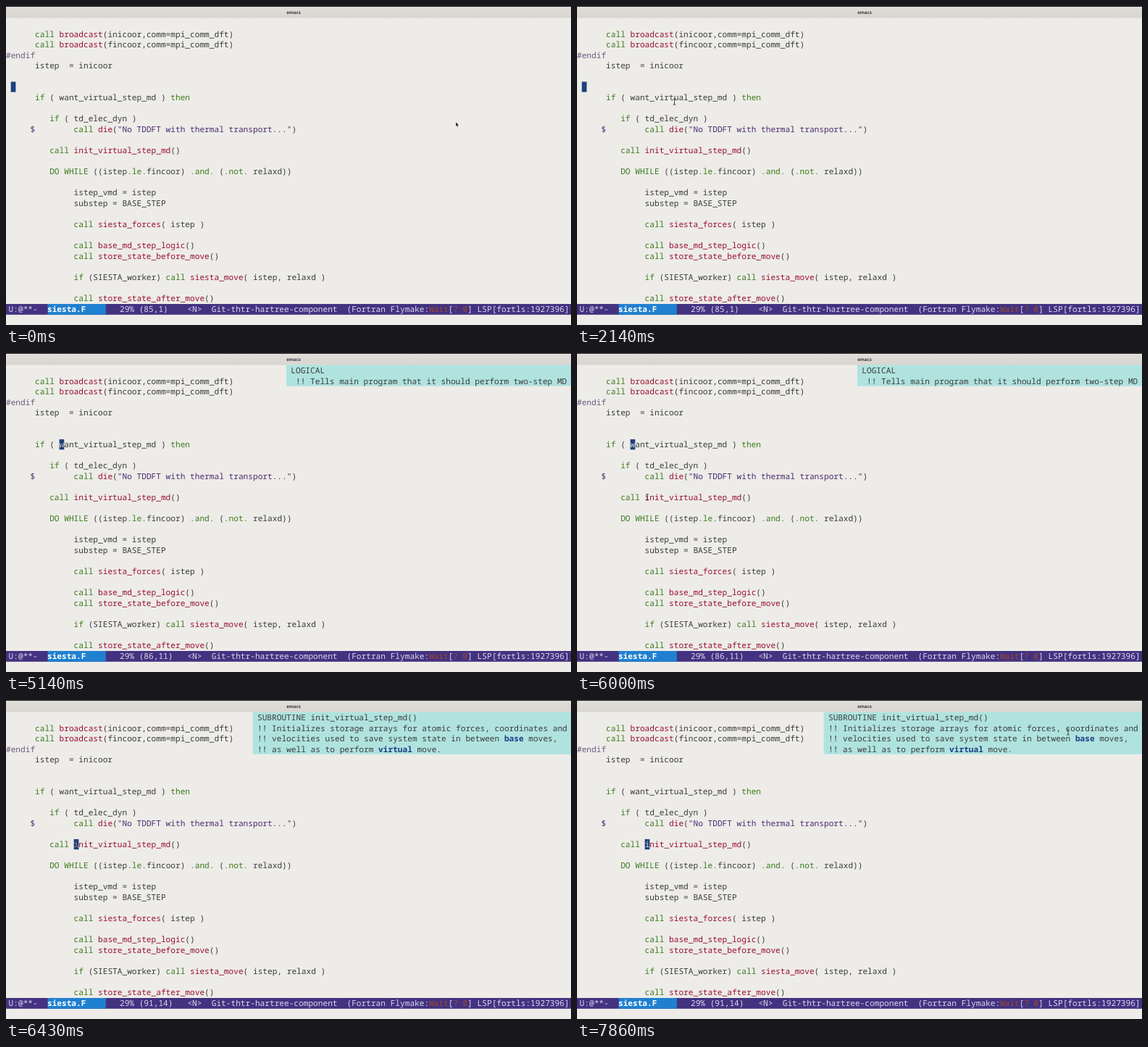
Recreate the animation shown at these times as an HTML page. Size 780 by 440 pixels, loop 8000 ms.

```html
<!DOCTYPE html>
<html lang="en">
<head>
<meta charset="utf-8">
<title>Editor hover help</title>
<style>
html, body { margin: 0; width: 100%; height: 100%; overflow: hidden; background: #edece8; }
svg { display: block; }
text { font: 11.15px "Noto Sans Mono", "DejaVu Sans Mono", monospace; fill: #3b3b3d; white-space: pre; text-rendering: geometricPrecision; }
.key { fill: #3c7a1c; }
.fun { fill: #98102f; }
.str { fill: #4b2b70; }
.pre { fill: #6b5a80; }
.em { fill: #1b3f80; font-weight: bold; }
#title { font: bold 6.2px "Noto Sans", "Open Sans", sans-serif; text-anchor: middle; }
#mode text { fill: #dcd8ee; }
#mode .warn { fill: #9c4a2c; }
#mode .file { fill: #fff; font-weight: bold; }
#letter { fill: #d5d8e2; }
</style>
</head>
<body>
<svg width="780" height="440" viewBox="0 0 780 440">
  <defs>
    <linearGradient id="bar" x2="0" y2="1">
      <stop stop-color="#e2dfdb"/><stop offset="1" stop-color="#d8d5d0"/>
    </linearGradient>
  </defs>
  <rect width="780" height="440" fill="#edece8"/>
  <rect width="780" height="16.5" fill="url(#bar)"/>
  <rect width="780" height="1" fill="#151515"/>
  <text id="title" x="397" y="11.2">emacs</text>
  <g id="code"></g>
  <g id="mode">
    <rect y="411" width="780" height="14.8" fill="#433280"/>
    <rect x="57.5" y="411" width="80.3" height="14.8" fill="#2080d0"/>
  </g>
  <g id="caret"><rect width="6.7" height="14.2" fill="#20407c"/><text id="letter" y="11.1"></text></g>
  <g id="popups"></g>
  <g id="mouse">
    <path id="beam" d="M-1.8-4H1.8M0-4V4M-1.8 4H1.8" fill="none" stroke="#3a3436" stroke-width=".9"/>
    <path id="arrow" d="M0 0V6.2L1.4 5L2.4 7.2L3.4 6.7L2.5 4.6H4.3Z" fill="#111" stroke="#fff" stroke-width=".4"/>
  </g>
</svg>
<script>
const CELL = 6.69, ROW = 14.58, TOP = 17, STEP = 8000 / 56;
const $ = id => document.getElementById(id);
const rowTop = row => TOP + row * ROW;

function make(parent, tag, attrs) {
  const el = document.createElementNS("http://www.w3.org/2000/svg", tag);
  for (const name in attrs) el.setAttribute(name, attrs[name]);
  return parent.appendChild(el);
}

function write(parent, x, row, text, cls = "") {
  const el = make(parent, "text", { x, y: rowTop(row) + 11.1, class: cls });
  el.textContent = text;
  return el;
}

const source = `
      call broadcast(inicoor,comm=mpi_comm_dft)
      call broadcast(fincoor,comm=mpi_comm_dft)
#endif
      istep  = inicoor


      if ( want_virtual_step_md ) then

         if ( td_elec_dyn )
     $        call die("No TDDFT with thermal transport...")

         call init_virtual_step_md()

         DO WHILE ((istep.le.fincoor) .and. (.not. relaxd))

              istep_vmd = istep
              substep = BASE_STEP

              call siesta_forces( istep )

              call base_md_step_logic()
              call store_state_before_move()

              if (SIESTA_worker) call siesta_move( istep, relaxd )

              call store_state_after_move()`.split("\n");

const syntax = /(?<str>"[^"]*"|\$)|(?<pre>#endif)|(?<fun>(?<=call )\w+)|(?<key>\b(?:call|if|then|DO WHILE)\b|\.(?:le|and|not)\.)/g;
source.forEach((line, row) => {
  write($("code"), 0, row, "").innerHTML = line.replace(syntax, (match, ...rest) => {
    const groups = rest.at(-1);
    const cls = Object.keys(groups).find(name => groups[name]);
    return `<tspan class="${cls}">${match}</tspan>`;
  });
});

const status = (col, text, cls) => write($("mode"), 3.6 + col * 6.67, 27, text, cls);
status(0, "U:@**-");
status(8, "siesta.F", "file");
status(23, "29%");
const position = status(27, "");
status(37, "<N>");
status(42, "Git-thtr-hartree-component");
status(70, "(Fortran Flymake:");
status(87, "Wait", "warn");
status(91, "[");
status(92, "? 0", "warn");
status(95, "]");
status(97, "LSP[fortls:1927396]");

function popup(left, lines) {
  const g = make($("popups"), "g", {});
  make(g, "rect", { x: left, y: TOP - .5, width: 780 - left, height: lines.length * ROW, fill: "#b0e3df" });
  lines.forEach((line, row) => {
    write(g, left + 6.3, row, "").innerHTML = line.replace(/\*(\w+)\*/g, '<tspan class="em">$1</tspan>');
  });
  return { g, left, bottom: TOP + lines.length * ROW };
}

const help = [
  popup(387, ["LOGICAL", " !! Tells main program that it should perform two-step MD"]),
  popup(340.7, [
    "SUBROUTINE init_virtual_step_md()",
    "!! Initializes storage arrays for atomic forces, coordinates and",
    "!! velocities used to save system state in between *base* moves,",
    "!! as well as to perform *virtual* move."
  ])
];

// Caret places: start step, buffer line, column, row on screen
const carets = [[0, 85, 1, 6], [20, 86, 11, 7], [43, 91, 14, 12]];

// Pointer path: step, x, y
const path = [
  [0, 621, 160], [10, 621, 160], [11, 600, 159], [12, 600, 159], [13, 430, 150],
  [15, 134.5, 132], [17, 84, 128], [18, 77, 126.5], [36, 77, 126.5], [37, 78, 130],
  [40, 90, 175], [42, 97, 199], [48, 97, 199], [49, 130, 190], [55, 678, 44]
];

function pointerAt(step) {
  const next = path.findIndex(p => p[0] > step);
  if (next < 0) return path.at(-1).slice(1);
  const [s0, x0, y0] = path[next - 1], [s1, x1, y1] = path[next];
  const k = (step - s0) / (s1 - s0);
  return [x0 + (x1 - x0) * k, y0 + (y1 - y0) * k];
}

function draw(now) {
  const step = Math.floor((now % 8000 + 5) / STEP);

  const [, line, col, row] = carets.findLast(c => step >= c[0]);
  position.textContent = `(${line},${col})`;
  $("caret").setAttribute("transform", `translate(${col * CELL} ${rowTop(row)})`);
  $("letter").textContent = source[row][col] || "";

  const open = step >= 45 ? help[1] : step >= 22 && step < 43 ? help[0] : null;
  for (const h of help) h.g.style.display = h === open ? "" : "none";

  const [x, y] = pointerAt(step);
  const width = (source[Math.floor((y - TOP) / ROW)] || "").length * CELL;
  const overText = x < width || (open && x > open.left && y < open.bottom);
  $("mouse").setAttribute("transform", `translate(${x} ${y})`);
  $("beam").style.display = overText ? "" : "none";
  $("arrow").style.display = overText ? "none" : "";
}

const start = performance.now();
function tick() {
  draw(performance.now() - start);
  requestAnimationFrame(tick);
}
tick();
</script>
</body>
</html>
```
